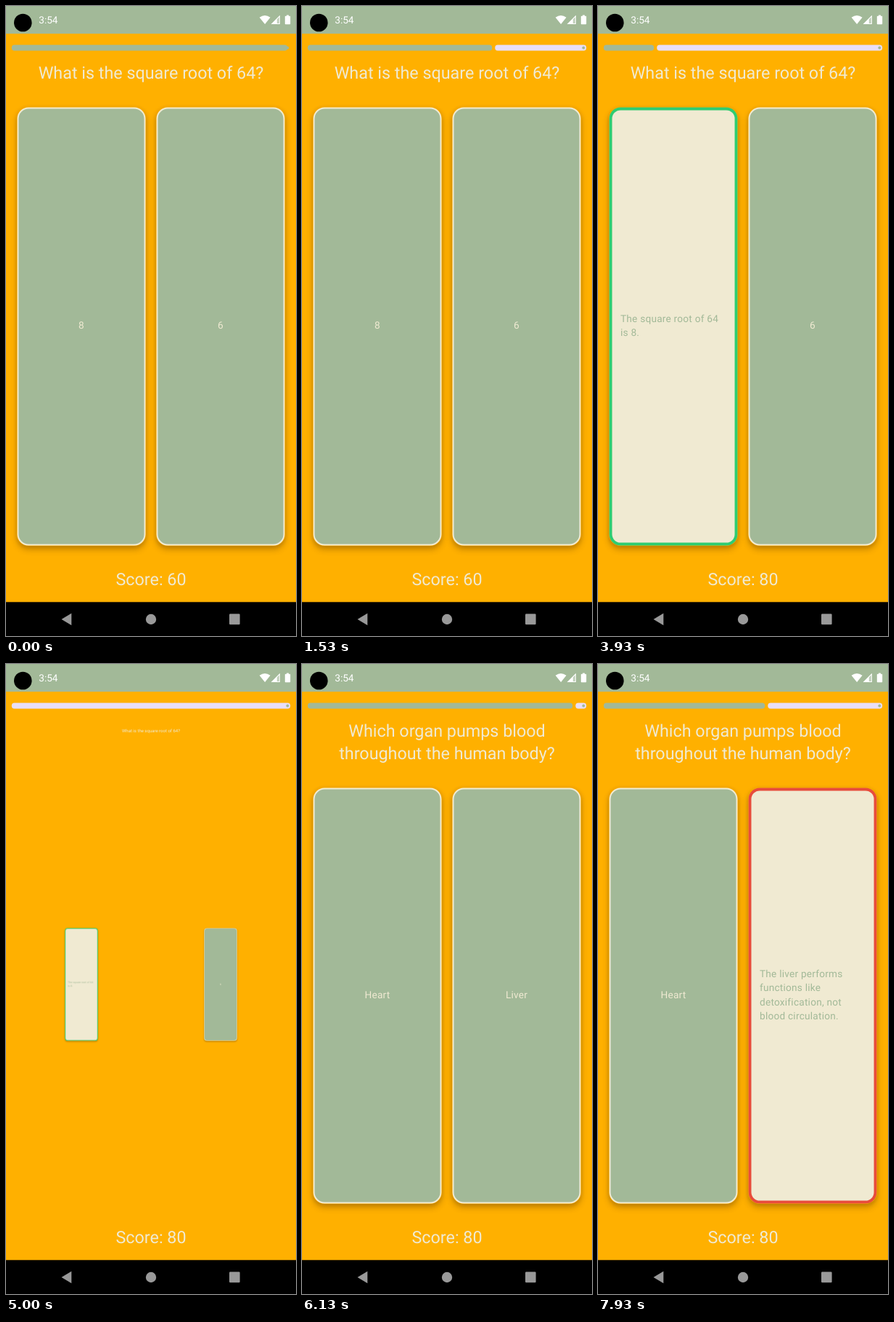
Write an HTML page that moves like this. It is 400 by 867 pixels and loops after 8000 ms.

```html
<!DOCTYPE html>
<html lang="en">
<head>
<meta charset="utf-8">
<title>Quiz</title>
<style>
  :root { --sage: #a2b998; --cream: #f0ead2; --orange: #ffb000; }
  html, body { margin: 0; width: 100%; height: 100%; overflow: hidden; background: var(--orange); }
  #stage { position: relative; width: 400px; height: 867px; overflow: hidden;
    background: var(--orange); color: var(--cream); font-family: Roboto, sans-serif;
    text-rendering: geometricPrecision; }
  #stage div { position: absolute; box-sizing: border-box; }
  #clock { left: 45.3px; top: 11.5px; font-size: 13.6px; line-height: 16px; color: #fff; }
  svg { position: absolute; left: 0; top: 0; }
  .head { left: 0; width: 400px; text-align: center; white-space: pre; font-size: 23.33px; line-height: 31.1px; }
  #question { top: 76.5px; }
  #score { top: 774.3px; }
  .slot { width: 178px; }
  .card { inset: 0; border-radius: 16px; color: var(--cream);
    box-shadow: 0 5px 8px rgba(70, 40, 0, .3), 0 1px 5px rgba(70, 40, 0, .14); }
  .card svg { width: 100%; height: 100%; }
  .card.back { color: var(--sage); }
  .label { inset: 0 16px; display: flex; align-items: center; justify-content: center; white-space: pre;
    font-size: 13.61px; line-height: 19.44px; letter-spacing: .243px; }
  .back .label { justify-content: flex-start; }
</style>
</head>
<body>
<div id="stage">
  <svg width="400" height="867">
    <rect width="400" height="38.1" fill="#a2b998"/>
    <rect y="820.3" width="400" height="47"/>
    <rect id="done" x="7.8" y="53.6" height="7.8" rx="3.9" fill="#a2b998"/>
    <rect id="track" y="53.6" height="7.8" rx="3.9" fill="#e8def8"/>
    <circle cx="388.3" cy="57.5" r="1.95" fill="#a2b998"/>
    <circle cx="23.3" cy="23" r="12.3"/>
    <g fill="#fff">
      <path d="M349.6 15.8Q357 10 364.6 15.8L357.1 25Z"/>
      <path d="M377.8 12.8V25H365.6Z" fill-opacity=".35"/>
      <path d="M377.8 12.8V25H365.6ZM376.8 15.2L373.8 18.2V24H376.8Z" fill-rule="evenodd"/>
      <path d="M387 13.8V12.6H390V13.8H391.4Q392.2 13.8 392.2 14.6V24.4Q392.2 25.2 391.4 25.2H385.6Q384.8 25.2 384.8 24.4V14.6Q384.8 13.8 385.6 13.8Z"/>
    </g>
    <g fill="#999">
      <path d="M76.5 844L90.3 835.8V852.2Z"/>
      <circle cx="200" cy="844" r="7.2"/>
      <rect x="308" y="836.6" width="14.6" height="14.6" rx="1.2"/>
    </g>
  </svg>
  <div id="clock">3:54</div>
  <div id="question" class="head"></div>
  <div class="slot" style="left:15px"><div class="card"><svg><rect/></svg><div class="label"></div></div></div>
  <div class="slot" style="left:207px"><div class="card"><svg><rect/></svg><div class="label"></div></div></div>
  <div id="score" class="head"></div>
</div>
<script>
const LOOP = 8000, EXIT = 4850, ENTER = 5160, FLIP_MS = 600;
const CARD_W = 178, CARD_BOTTOM = 743, INSET = .55;
const SAGE = "#a2b998", CREAM = "#f0ead2";

const rounds = [
  { text: "What is the square root of 64?", top: 139, picked: 0, tap: 2250, ring: "#2ecc71",
    fronts: ["8", "6"], back: "The square root of 64\nis 8." },
  { text: "Which organ pumps blood\nthroughout the human body?", top: 170, picked: 1, tap: 6431, ring: "#e74c3c",
    fronts: ["Heart", "Liver"], back: "The liver performs\nfunctions like\ndetoxification, not\nblood circulation." }
];

// Remaining time as bar width: [ms, px]
const timer = [[0, 380.5], [1530, 254.5], [2600, 172.3], [3930, 69.5], [EXIT, 0],
  [5895, 0], [5895, 384.4], [6730, 317.5], [LOOP, 217]];

const $ = id => document.getElementById(id);
const slots = [...document.querySelectorAll(".slot")];
const clamp = v => Math.min(1, Math.max(0, v));

function setText(el, text) {
  if (el.textContent !== text) el.textContent = text;
}

function setAttrs(el, attrs) {
  for (const name in attrs) el.setAttribute(name, attrs[name]);
}

function timerWidth(t) {
  let i = 1;
  while (i < timer.length - 1 && t >= timer[i][0]) i++;
  const [t0, a] = timer[i - 1], [t1, b] = timer[i];
  return a + (b - a) * clamp((t - t0) / (t1 - t0));
}

// cubic-bezier(.4, 0, .2, 1)
function ease(x) {
  if (x <= 0 || x >= 1) return clamp(x);
  let lo = 0, hi = 1, u = x;
  for (let i = 0; i < 30; i++) {
    u = (lo + hi) / 2;
    const bx = 1.2 * u * (1 - u) ** 2 + .6 * u * u * (1 - u) + u ** 3;
    if (bx < x) lo = u; else hi = u;
  }
  return 3 * u * u * (1 - u) + u ** 3;
}

// Slightly bouncy spring from 0 to 1
function spring(ms) {
  const w = Math.sqrt(200), z = .75, wd = w * Math.sqrt(1 - z * z), s = ms / 1000;
  return 1 - Math.exp(-z * w * s) * (Math.cos(wd * s) + z * w / wd * Math.sin(wd * s));
}

function pageScale(t) {
  if (t < EXIT) return 1;
  return t < ENTER ? Math.max(0, 1 - spring(t - EXIT)) : spring(t - ENTER);
}

function drawBar(t) {
  const w = timerWidth(t), start = 7.8 + w + Math.min(w, 4), rest = 392.2 - start;
  setAttrs($("done"), { width: w });
  setAttrs($("track"), { x: start, width: rest > 2 ? rest : 0 });
}

function drawCard(slot, i, round, t, scale) {
  const card = slot.firstElementChild, label = card.lastElementChild;
  const angle = i === round.picked ? 180 * ease((t - round.tap) / FLIP_MS) : 0;
  const back = angle > 90, line = back ? 3.9 : 1.95;
  const height = CARD_BOTTOM - round.top, edge = INSET + line / 2;
  slot.style.top = round.top + "px";
  slot.style.height = height + "px";
  slot.style.transform = `scale(${scale})`;
  card.classList.toggle("back", back);
  card.style.transform = angle ? `perspective(841px) rotateY(${angle}deg)` : "none";
  setAttrs(card.querySelector("rect"), {
    x: edge, y: edge, width: CARD_W - 2 * edge, height: height - 2 * edge, rx: 15.5 - line / 2,
    fill: back ? CREAM : SAGE, stroke: back ? round.ring : CREAM, "stroke-width": line
  });
  label.style.transform = back ? `perspective(165px) rotateY(${angle}deg)` : "none";
  setText(label, back ? round.back : round.fronts[i]);
}

function draw(t) {
  const round = rounds[t < ENTER ? 0 : 1], scale = pageScale(t);
  drawBar(t);
  setText($("question"), round.text);
  $("question").style.transform = `scale(${scale})`;
  setText($("score"), "Score: " + (t < rounds[0].tap ? 60 : 80));
  slots.forEach((slot, i) => drawCard(slot, i, round, t, scale));
}

function tick() {
  draw(performance.now() % LOOP);
  requestAnimationFrame(tick);
}
tick();
</script>
</body>
</html>
```
